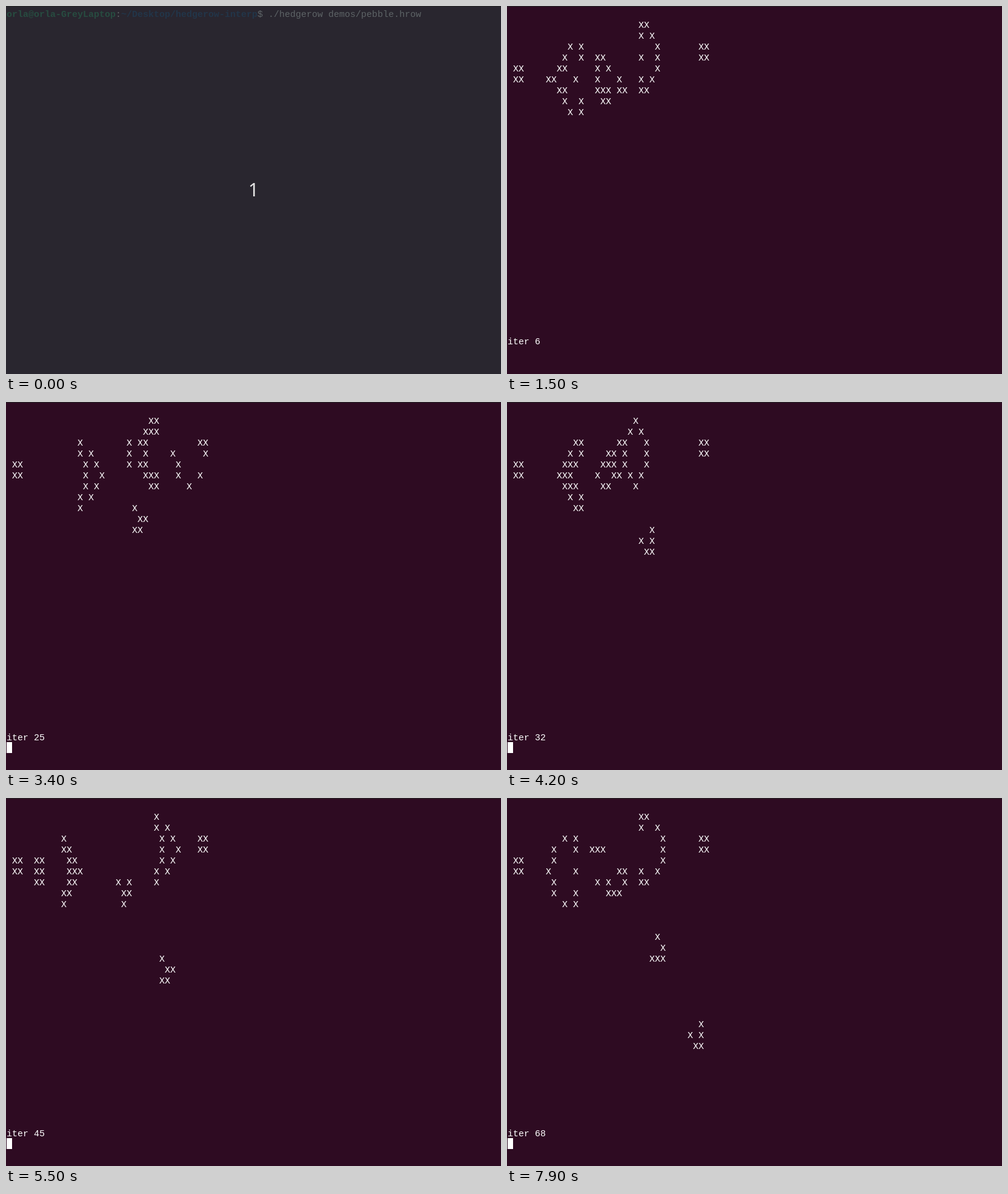
An HTML page that plays this animation: 817 px wide and 607 px high, repeating every 8 s.

```html
<!DOCTYPE html>
<html lang="en">
<head>
<meta charset="utf-8">
<title>Glider gun in a terminal</title>
<style>
  html, body { margin: 0; width: 100%; height: 100%; overflow: hidden; background: #2e0b22; }
  svg { display: block; }
  .term text { font: 15px "Liberation Mono", monospace; fill: #fff; white-space: pre; }
  .term .user { font-weight: bold; fill: #26a269; }
  .term .path { font-weight: bold; fill: #12488b; }
  #overlay text { font: 30px "Noto Sans", sans-serif; fill: #e4e4e4; text-anchor: middle; }
</style>
</head>
<body>
<svg width="817" height="607" viewBox="0 0 817 607">
  <rect width="817" height="607" fill="#2e0b22"/>
  <g class="term">
    <text id="prompt" x="1" y="18"><tspan class="user">orla@orla-GreyLaptop</tspan>:<tspan class="path">~/Desktop/hedgerow-interp</tspan>$ ./hedgerow demos/pebble.hrow</text>
    <g id="board"></g>
    <rect id="cursor" width="9" height="18" fill="#fff"/>
  </g>
  <g id="overlay">
    <rect width="817" height="607" fill="rgb(39, 47, 51)" fill-opacity=".75"/>
    <text x="408.5" y="314">1</text>
  </g>
  <rect width="817" height="1" fill="#232323"/>
</svg>
<script>
const LOOP = 8000, TICK = 100, BLINK = 570;
const ENTER = 7, START = 9, PAUSES = [35, 61];
const COLS = 90, ROWS = 30, CELL_W = 9, CELL_H = 18, BASELINE = 18;
const LAST_ITER = 68;

const gun = [
  '',
  '                         X',
  '                       X X',
  '             XX      XX            XX',
  '            X   X    XX            XX',
  ' XX        X     X   XX',
  ' XX        X   X XX    X X',
  '           X     X       X',
  '            X   X',
  '             XX'
];

const makeGrid = rule => Array.from({ length: ROWS }, (_, r) =>
  Array.from({ length: COLS }, (_, c) => rule(r, c)));

function evolve(grid) {
  const at = (r, c) => grid[r]?.[c] ? 1 : 0;
  return makeGrid((r, c) => {
    let sum = -at(r, c);
    for (let dr = -1; dr <= 1; dr++)
      for (let dc = -1; dc <= 1; dc++) sum += at(r + dr, c + dc);
    return sum === 3 || (sum === 2 && grid[r][c]);
  });
}

const toLines = grid => grid.map(row =>
  row.map(alive => alive ? 'X' : ' ').join('').trimEnd());

const screens = [];
let grid = makeGrid((r, c) => gun[r]?.[c] === 'X');
for (let i = 0; i <= LAST_ITER; i++) {
  grid = evolve(grid);
  screens.push([...toLines(grid), `iter ${i}`]);
}

const [promptEl, board, cursor, overlay] =
  ['prompt', 'board', 'cursor', 'overlay'].map(id => document.getElementById(id));

const lines = screens[0].map((_, row) => {
  const line = document.createElementNS('http://www.w3.org/2000/svg', 'text');
  line.setAttribute('x', 1);
  line.setAttribute('y', BASELINE + row * CELL_H);
  return board.appendChild(line);
});

const show = (el, visible) => el.setAttribute('visibility', visible ? 'visible' : 'hidden');

function placeCursor(col, row, visible) {
  cursor.setAttribute('x', 1 + col * CELL_W);
  cursor.setAttribute('y', 3 + row * CELL_H);
  show(cursor, visible);
}

function draw(tick) {
  const running = tick >= START;
  show(promptEl, !running);
  show(board, running);
  overlay.setAttribute('opacity', [1, 0.5][tick] ?? 0);

  if (running) {
    const iter = tick - START - PAUSES.filter(p => tick >= p).length;
    lines.forEach((line, row) => line.textContent = screens[iter][row]);
  }

  const lit = Math.floor((tick - ENTER) * TICK / BLINK) % 2 === 0;
  if (tick < ENTER) placeCursor(77, 0, tick >= 2);
  else placeCursor(0, running ? 31 : 1, lit);
}

const begin = performance.now();
let shown = -1;
function frame() {
  const tick = Math.floor((performance.now() - begin) % LOOP / TICK);
  if (tick !== shown) draw(shown = tick);
  requestAnimationFrame(frame);
}
frame();
</script>
</body>
</html>
```
